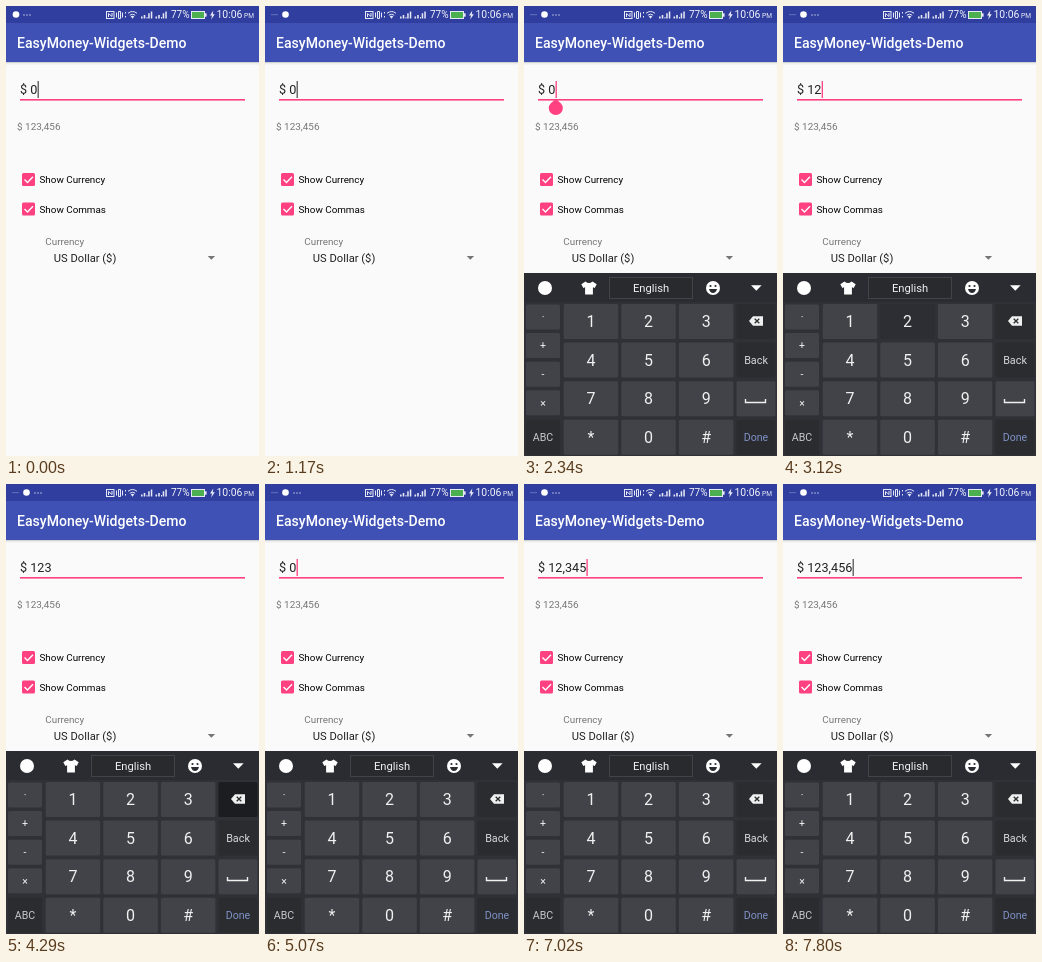
Write an HTML page that moves like this. It is 253 by 450 pixels and loops after 8 s.

```html
<!DOCTYPE html>
<html lang="en">
<head>
<meta charset="utf-8">
<title>Money input demo</title>
<style>
  html, body { margin: 0; width: 100%; height: 100%; overflow: hidden; background: #fafafa; }
  svg { display: block; width: 100%; height: 100%; }
  text { font-family: Roboto, "Open Sans", sans-serif; white-space: pre; }
</style>
</head>
<body>
<svg id="stage" viewBox="0 0 253 450">
  <rect width="253" height="450" fill="#fafafa"/>

  <!-- app bar -->
  <rect y="56" width="253" height="1" fill="#000" opacity=".16"/>
  <rect y="57" width="253" height="1.5" fill="#000" opacity=".05"/>
  <rect y="17" width="253" height="39" fill="#3f51b5"/>
  <text x="11" y="42" font-size="14.06" font-weight="500" fill="#fff">EasyMoney-Widgets-Demo</text>

  <!-- status bar -->
  <rect width="253" height="17" fill="#303f9f"/>
  <rect id="faint" x="6" y="8" width="7" height="1.2" fill="#5a68b8"/>
  <circle id="badge" cy="8.5" r="3.3" fill="#fff"/>
  <g id="dots" fill="#d5d9ee">
    <circle cx="-3" cy="9" r=".7"/><circle cy="9" r=".7"/><circle cx="3" cy="9" r=".7"/>
  </g>
  <g fill="none" stroke="#e6e8f5" stroke-width="1">
    <rect x="100.5" y="5.5" width="7.5" height="7"/>
    <path d="M102.5 11V7.5l3.5 3V7M110.5 6.5v5M112.5 5.5h2v7h-2zM116.5 6.5v5"/>
    <path d="M122 7.3q4.5-3.6 9 0M123.8 9.2q2.7-2 5.4 0"/>
    <path d="M119.5 6v1.5M119.5 10v1.5"/>
  </g>
  <g fill="#e6e8f5">
    <path d="M124.7 10.3q1.8-1 3.6 0l-1.8 2.4z"/>
    <path id="bars" d="M135 10.5h1.6v2H135zM137.7 9h1.6v3.5h-1.6zM140.5 11h1v1.5h-1zM142.2 7.3h1.5v5.2h-1.5zM144.8 5.5h1.5v7h-1.5z"/>
    <use href="#bars" x="14.5"/>
    <path d="M207.3 4.5l-3.3 5h2l-.8 4 3.6-5.3h-2z"/>
  </g>
  <rect x="185.5" y="5.5" width="13" height="7" fill="#4caf50" stroke="#e6e8f5"/>
  <rect x="199" y="7.3" width="1.6" height="3.4" fill="#e6e8f5"/>
  <g fill="#f2f3fb">
    <text x="165" y="12.4" font-size="10">77%</text>
    <text x="210.5" y="12.4" font-size="10.4">10:06</text>
    <text x="238" y="12.4" font-size="6.6">PM</text>
  </g>

  <!-- form -->
  <text id="amount" x="14" y="88" font-size="12.65" fill="#212121"></text>
  <rect id="caret" y="75" width="1.3" height="17"/>
  <rect x="14" y="93" width="225" height="1.6" fill="#ff4081"/>
  <path id="handle" d="M31.8 93l5 4.2a7 7 0 1 1-10 0z" fill="#ff4081"/>
  <text x="11" y="124" font-size="9.95" fill="#757575">$ 123,456</text>
  <g id="box">
    <rect x="16" y="167" width="13" height="13" rx="1.5" fill="#ff4081"/>
    <path d="M18.5 173.5l3 3 5.5-5.7" fill="none" stroke="#fff" stroke-width="1.4"/>
  </g>
  <use href="#box" y="29.5"/>
  <g font-size="9.85" fill="#000">
    <text x="33.5" y="177">Show Currency</text>
    <text x="33.5" y="206.5">Show Commas</text>
  </g>
  <text x="39.3" y="239" font-size="9.85" fill="#757575">Currency</text>
  <text x="47.8" y="256" font-size="11.2" fill="#212121">US Dollar ($)</text>
  <path d="M201.7 250h7.4l-3.7 3.8z" fill="#757575"/>

  <!-- keyboard -->
  <g id="keyboard">
    <rect y="267" width="253" height="183" fill="#303136"/>
    <rect y="267" width="253" height="29" fill="#2b2c31"/>
    <circle cx="21" cy="282" r="7" fill="#fff"/>
    <path d="M61.5 275.5q3.5 3 7 0l4.2 2.7-2 3.8-1.8-.8v7.3h-7.8v-7.3l-1.8.8-2-3.8z" fill="#fff"/>
    <rect x="85.5" y="271.5" width="83" height="21" fill="#292a2e" stroke="#424349"/>
    <text x="127" y="286" font-size="11.2" fill="#f0f0f0" text-anchor="middle">English</text>
    <circle cx="189" cy="282" r="7" fill="#fff"/>
    <g fill="#2b2c31">
      <circle cx="186.5" cy="280" r="1.1"/><circle cx="191.5" cy="280" r="1.1"/>
      <path d="M185 283h8q-1 4-4 4t-4-4z"/>
    </g>
    <path d="M227 279.3h10.6l-5.3 5.4z" fill="#fff"/>
    <g id="keys"></g>
    <path d="M225 315l4-4.7h10v9.4h-10z" fill="#f0f0f0"/>
    <path d="M230.7 312.7l4.6 4.6m0-4.6l-4.6 4.6" stroke="#2b2c30" stroke-width="1.3"/>
    <path d="M221.5 393v3.5h20V393" fill="none" stroke="#f0f0f0" stroke-width="1.4"/>
    <rect id="scroll" x="35.3" y="297" width="2" height="57" rx="1" fill="#77787e"/>
  </g>
</svg>
<script>
const LOOP = 8000;
const KEY = '#424349', DARK = '#2b2c30';
const $ = id => document.getElementById(id);

function add(parent, name, attrs, label) {
  const el = document.createElementNS('http://www.w3.org/2000/svg', name);
  for (const k in attrs) el.setAttribute(k, attrs[k]);
  if (label) el.textContent = label;
  parent.appendChild(el);
  return el;
}

function addKey(x, y, width, height, label, size, fill = KEY, color = '#f0f0f0') {
  const face = add($('keys'), 'rect', { x, y, width, height, rx: 1.5, fill });
  add($('keys'), 'text', {
    x: x + width / 2, y: y + height / 2 + size * 0.36,
    'font-size': size, fill: color, 'text-anchor': 'middle'
  }, label);
  return face;
}

const rowY = row => 298 + row * 38.6;
const faces = {};
[...'123456789*0#'].forEach((label, i) => {
  faces[label] = addKey(39.7 + (i % 3) * 57.6, rowY(Math.floor(i / 3)), 54.5, 35, label, 16);
});
['·', '+', '-', '×'].forEach((label, i) => addKey(2, 298.5 + i * 28.6, 34, 25, label, 10.5));
addKey(2, rowY(3), 34, 35, 'ABC', 10.6, DARK, '#c8c9cd');
faces.del = addKey(212.5, rowY(0), 39, 35, '', 10, DARK);
addKey(212.5, rowY(1), 39, 35, 'Back', 10.8, DARK, '#d8d9dc');
addKey(212.5, rowY(2), 39, 35, '', 10);
addKey(212.5, rowY(3), 39, 35, 'Done', 10.6, DARK, '#7f93c8');

// start time, digits typed so far
const edits = [
  [0, 0], [2730, 1], [3120, 12], [3510, 123], [4680, 12], [5070, 0],
  [5460, 1], [5850, 12], [6240, 123], [6630, 1234], [7020, 12345], [7410, 123456]
];

const within = (t, from, to) => t >= from && t < to;
const show = (id, on) => $(id).setAttribute('visibility', on ? 'inherit' : 'hidden');

function draw(t) {
  const value = edits.filter(e => e[0] <= t).pop()[1];
  const amount = $('amount');
  amount.textContent = '$ ' + value.toLocaleString('en-US');

  const caret = $('caret');
  caret.setAttribute('x', 14.2 + amount.getComputedTextLength());
  caret.setAttribute('fill', t < 1560 || t >= 7800 ? '#555' : '#ff4081');
  show('caret', !(within(t, 780, 1170) || within(t, 1560, 1950) || within(t, 4290, 4680)));

  const shifted = t >= 1170;
  show('faint', shifted);
  $('badge').setAttribute('cx', shifted ? 20.5 : 10);
  $('dots').setAttribute('transform', `translate(${shifted ? 32 : 21} 0)`);
  show('dots', !within(t, 1170, 1560));

  show('keyboard', t >= 1560);
  show('handle', within(t, 1560, 2730));
  show('scroll', within(t, 1560, 1950));
  faces[2].setAttribute('fill', within(t, 3120, 3510) ? '#2d2e33' : KEY);
  faces.del.setAttribute('fill', within(t, 4290, 4680) ? '#1c1d20' : DARK);
}

const start = performance.now();
function tick() {
  draw((performance.now() - start) % LOOP);
  requestAnimationFrame(tick);
}
tick();
</script>
</body>
</html>
```
